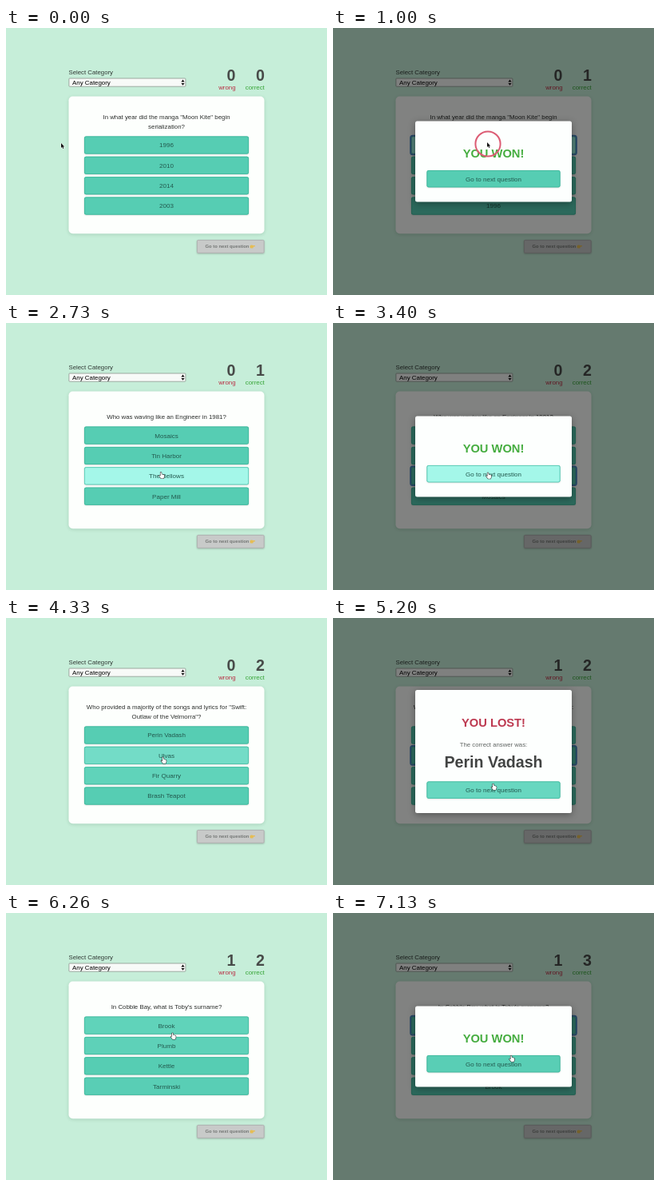
Write an HTML page with a canvas that moves like this. It is 402 px wide and 334 px high and loops after 7.2 s.

```html
<!DOCTYPE html>
<html lang="en">
<head>
<meta charset="utf-8">
<title>Quiz</title>
<style>
html, body { margin: 0; width: 100%; height: 100%; overflow: hidden; background: #c6eed9; }
canvas { display: block; width: 402px; height: 334px; }
</style>
</head>
<body>
<canvas id="stage"></canvas>
<script>
const W = 402, H = 334, LOOP = 7200, FADE = 300;
const canvas = document.getElementById('stage');
const ctx = canvas.getContext('2d');
const ratio = Math.max(1, window.devicePixelRatio || 1);
canvas.width = W * ratio;
canvas.height = H * ratio;

// start: question shown, press: answer clicked, open: dialog shown, next: dialog button clicked
const rounds = [
  { start: 0, press: 900, open: 1000, next: 1990, pick: 0, won: true, score: [0, 0],
    lines: ['In what year did the manga "Moon Kite" begin', 'serialization?'],
    answers: ['1996', '2010', '2014', '2003'] },
  { start: 2190, press: 2920, open: 3100, next: 3640, pick: 2, won: true, score: [0, 1],
    lines: ['Who was waving like an Engineer in 1981?'],
    answers: ['Mosaics', 'Tin Harbor', 'The Bellows', 'Paper Mill'] },
  { start: 3840, press: 4520, open: 4700, next: 5370, pick: 1, won: false, score: [0, 2],
    lines: ['Who provided a majority of the songs and lyrics for "Swift:', 'Outlaw of the Velmorra"?'],
    answers: ['Perin Vadash', 'Ulvas', 'Fir Quarry', 'Brash Teapot'] },
  { start: 5560, press: 6420, open: 6600, next: LOOP, pick: 0, won: true, score: [1, 2],
    lines: ["In Cobble Bay, what is Toby's surname?"],
    answers: ['Brook', 'Plumb', 'Kettle', 'Tarminski'] }
];

// time, x, y of the pointer tip
const path = [
  [0, 69, 144], [60, 69, 144], [660, 193, 143], [1150, 193, 143], [1750, 194, 186],
  [4080, 194, 187], [4260, 195.5, 182], [4330, 196.5, 174], [4440, 197, 170],
  [4800, 197, 170], [5200, 200.5, 207], [5300, 201, 213], [5900, 201, 213],
  [6260, 208.5, 150], [6360, 209, 142], [6730, 209, 142], [6800, 210, 146],
  [7000, 212, 152], [7130, 223, 178], [7200, 223.5, 180]
];

function pointerAt(t) {
  let i = 1;
  while (i < path.length - 1 && path[i][0] < t) i++;
  const [t0, x0, y0] = path[i - 1], [t1, x1, y1] = path[i];
  const k = Math.min(1, Math.max(0, (t - t0) / (t1 - t0)));
  const e = t1 - t0 >= 350 ? k * k * (3 - 2 * k) : k;
  return { x: x0 + (x1 - x0) * e, y: y0 + (y1 - y0) * e };
}

const roundAt = t => rounds.filter(r => r.start <= t).pop() || rounds[0];
const answerTop = (round, i) => (round.lines.length > 1 ? 135.5 : 129.6) + i * 25.35;
const dialogButtonTop = round => round.won ? 178 : 204.5;

// Returns 0-3 for answers, 4 for the dialog button, -1 for nothing
function hitAt(t) {
  const round = roundAt(t), { x, y } = pointerAt(t);
  if (t >= round.open) {
    const top = dialogButtonTop(round);
    return x > 117.5 && x < 284.5 && y >= top && y < top + 21.5 ? 4 : -1;
  }
  if (x < 98 || x > 304) return -1;
  return [0, 1, 2, 3].findIndex(i => {
    const top = answerTop(round, i);
    return y >= top && y < top + 22;
  });
}

function hoverLevels(t) {
  const levels = [0, 0, 0, 0, 0], step = 10;
  for (let s = Math.max(0, t - 2 * FADE); s <= t; s += step) {
    const hit = hitAt(s);
    levels.forEach((v, i) => {
      levels[i] = Math.min(1, Math.max(0, v + (i === hit ? step : -step) / FADE));
    });
  }
  return levels;
}

const mix = (a, b, k) => `rgb(${a.map((v, i) => Math.round(v + (b[i] - v) * k))})`;

function box(x, y, w, h, r, fill, stroke, line = 1) {
  ctx.beginPath();
  ctx.roundRect(x, y, w, h, r);
  if (fill) { ctx.fillStyle = fill; ctx.fill(); }
  if (stroke) { ctx.strokeStyle = stroke; ctx.lineWidth = line; ctx.stroke(); }
}

function shadowBox(x, y, w, h, r, fill, color, blur, dy) {
  ctx.save();
  ctx.shadowColor = color;
  ctx.shadowBlur = blur * ratio;
  ctx.shadowOffsetY = dy * ratio;
  box(x, y, w, h, r, fill);
  ctx.restore();
}

function text(str, x, y, size, color, align = 'center', weight = 'normal') {
  ctx.font = `${weight} ${size}px "Liberation Sans", Arial, sans-serif`;
  ctx.textAlign = align;
  ctx.fillStyle = color;
  ctx.fillText(str, x, y);
}

function shape(points, fill, stroke, line) {
  ctx.beginPath();
  points.forEach(([x, y], i) => i ? ctx.lineTo(x, y) : ctx.moveTo(x, y));
  ctx.closePath();
  ctx.lineJoin = 'round';
  if (stroke) { ctx.strokeStyle = stroke; ctx.lineWidth = line; ctx.stroke(); }
  ctx.fillStyle = fill;
  ctx.fill();
}

function button(label, x, y, w, h, level, focused) {
  shadowBox(x, y, w, h, 2, '#4fc4a9', 'rgba(0,0,0,.16)', 2, 0.7);
  box(x + 0.4, y + 0.4, w - 0.8, h - 0.8, 2, mix([86, 205, 179], [164, 247, 233], level),
    mix([62, 184, 156], [92, 204, 184], level), 0.8);
  if (focused) box(x - 0.8, y - 0.8, w + 1.6, h + 1.6, 2.5, null, '#4a88c4', 2);
  text(label, x + w / 2, y + h / 2 + 2.9, 8.05, '#23594e');
}

function drawHeader(wrong, correct) {
  text('Select Category', 78.5, 57.6, 7.8, '#303834', 'left');
  box(78.9, 63, 146, 10.2, 0.8, '#f8faf8', '#8b968f', 0.8);
  text('Any Category', 83, 71, 7.9, '#000', 'left');
  shape([[219.4, 67.4], [221.5, 64.6], [223.6, 67.4]], '#111');
  shape([[219.4, 69], [221.5, 71.8], [223.6, 69]], '#111');
  text(wrong, 287.5, 66, 19.6, '#484b49', 'right', 'bold');
  text(correct, 323.8, 66, 19.6, '#484b49', 'right', 'bold');
  text('wrong', 287.5, 76.7, 7.85, '#b92c42', 'right');
  text('correct', 323.8, 76.7, 7.85, '#35a435', 'right');
}

function drawNextButton() {
  shadowBox(239, 265, 84.5, 16.7, 1.5, '#c8cac9', 'rgba(0,0,0,.25)', 2, 0.8);
  box(239.4, 265.4, 83.7, 15.9, 1.5, '#c8cac9', '#a9adab', 0.8);
  text('Go to next question', 249.5, 275.3, 5.85, '#747775', 'left', 'bold');
  box(305.5, 271.5, 4.3, 4, 1.6, '#e5bd55');
  box(307, 272, 5, 1.5, 0.7, '#e5bd55');
}

function drawQuestion(round, t, levels) {
  shadowBox(78.5, 85.5, 245, 171.7, 5, '#fdfffd', 'rgba(0,60,30,.16)', 4, 1);
  const first = round.lines.length > 1 ? 114 : 119.8;
  round.lines.forEach((line, i) => text(line, 201, first + i * 11.8, 7.85, '#2c2f2d'));
  const answered = t >= round.open;
  const labels = answered ? [...round.answers.slice(1), round.answers[0]] : round.answers;
  labels.forEach((label, i) => {
    const focused = i === round.pick && t >= round.press && t < round.next;
    button(label, 98, answerTop(round, i), 206, 22, levels[i], focused);
  });
}

function drawDialog(round, t, level) {
  ctx.fillStyle = 'rgba(0,0,0,.49)';
  ctx.fillRect(0, 0, W, H);
  const top = round.won ? 116.5 : 90, height = round.won ? 101 : 154;
  shadowBox(103, top, 196, height, 2.5, '#fdfffe', 'rgba(0,0,0,.35)', 8, 2);
  if (round.won) {
    text('YOU WON!', 201, 162, 14.7, '#46ad40', 'center', 'bold');
  } else {
    text('YOU LOST!', 201, 135.6, 14.7, '#bd3950', 'center', 'bold');
    text('The correct answer was:', 201, 161, 7.75, '#5f6361');
    text(round.answers[0], 201, 187, 19.6, '#424443', 'center', 'bold');
  }
  button('Go to next question', 117.5, dialogButtonTop(round), 167, 21.3, level, t >= round.next);
}

function drawPointer(t) {
  const { x, y } = pointerAt(t);
  const pressed = rounds.some(r => [r.press, r.next].some(p => t >= p && t < p + 170));
  if (pressed) {
    ctx.beginPath();
    ctx.arc(x + 1, y + 2, 15.6, 0, Math.PI * 2);
    ctx.strokeStyle = '#dc5c74';
    ctx.lineWidth = 2;
    ctx.stroke();
  }
  ctx.save();
  ctx.translate(x, y);
  if (hitAt(t) >= 0) {
    shape([[-0.6, 0.4], [0.6, 0.4], [0.9, 2.8], [3.8, 3.5], [4.3, 5], [3.4, 8],
      [0.2, 8], [-2.2, 4.8], [-1.6, 4.2], [-0.4, 5.2]], '#fff', '#2b2b2b', 1.1);
  } else {
    shape([[0, 0], [0, 6], [1.4, 4.8], [2.3, 7], [3.3, 6.5], [2.4, 4.5], [4.2, 4.4]],
      '#111', '#fff', 0.9);
  }
  ctx.restore();
}

function draw(t) {
  const round = roundAt(t), levels = hoverLevels(t), answered = t >= round.open;
  const [wrong, correct] = round.score;
  ctx.setTransform(ratio, 0, 0, ratio, 0, 0);
  ctx.fillStyle = '#c6eed9';
  ctx.fillRect(0, 0, W, H);
  drawHeader(wrong + (answered && !round.won), correct + (answered && round.won));
  drawQuestion(round, t, levels);
  drawNextButton();
  if (answered) drawDialog(round, t, levels[4]);
  drawPointer(t);
}

const begin = performance.now();
function tick() {
  draw((performance.now() - begin) % LOOP);
  requestAnimationFrame(tick);
}
tick();
</script>
</body>
</html>
```
